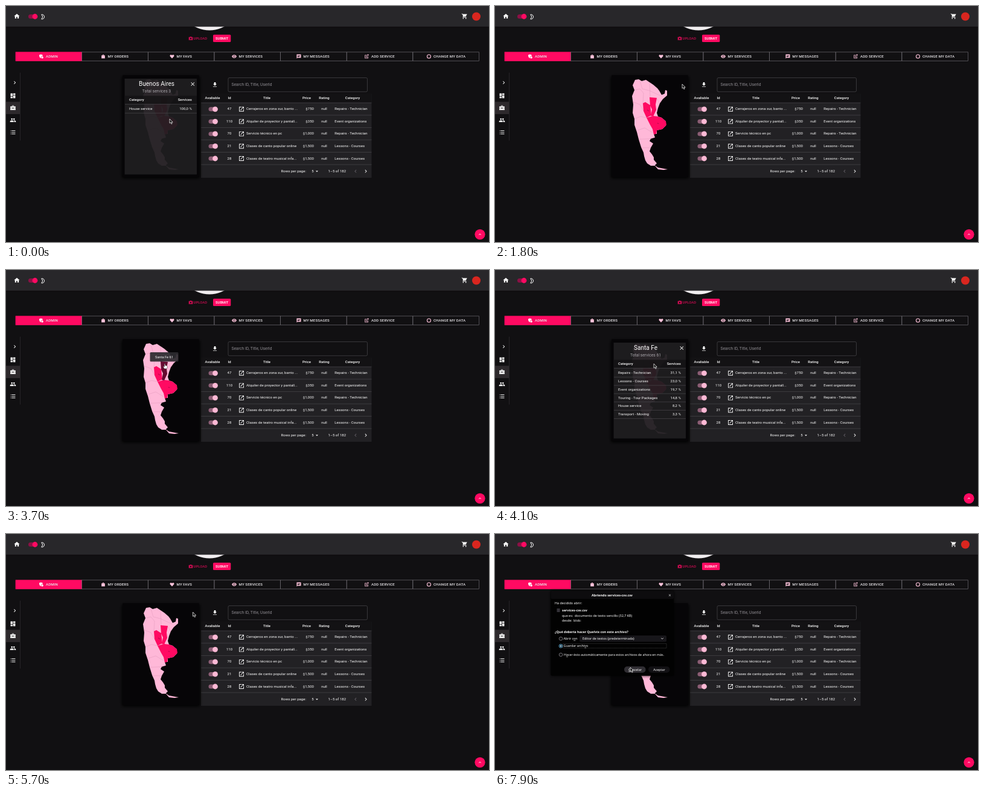
An HTML page that plays this animation: 800 px wide and 393 px high, repeating every 8 s.

```html
<!DOCTYPE html>
<html lang="en">
<head>
<meta charset="utf-8">
<title>Admin services</title>
<style>
  html, body { margin: 0; width: 100%; height: 100%; overflow: hidden; background: #111012; }
  svg { display: block; width: 100%; height: 100%; font: 6px Roboto, sans-serif; fill: #fff; letter-spacing: .04px; }
  path { fill-rule: evenodd; }
  .dialog { font-family: "Noto Sans", sans-serif; font-size: 5.4px; letter-spacing: 0; }
  .key { text-decoration: underline; }
</style>
</head>
<body>
<svg id="stage" viewBox="0 0 800 393"></svg>
<script>
const PINK = '#ff0a62', PALE = '#ffb8d8';

const ICONS = {
  home: 'M10 20v-6h4v6h5v-8h3L12 3 2 12h3v8z',
  cart: 'M7 18a2 2 0 100 4 2 2 0 000-4zM1 2v2h2l3.6 7.6-1.4 2.4C4.5 15.4 5.5 17 7 17h12v-2H7l1.1-2h7.5c.7 0 1.4-.4 1.7-1L21.7 4H5.2l-.9-2zM17 18a2 2 0 100 4 2 2 0 000-4z',
  camera: 'M9 3 7 5H2v15h20V5h-5l-2-2zM12 16a3.5 3.5 0 110-7 3.5 3.5 0 010 7z',
  shield: 'M10 2l8 3v6a6 6 0 00-7 9C5 20 2 14 2 5zM16.5 12a5 5 0 100 10 5 5 0 000-10z',
  bag: 'M4 7h16v14H4zM8 7a4 4 0 018 0h-2a2 2 0 00-4 0z',
  heart: 'M12 21L4 13C-1 8 5 1 12 6c7-5 13 2 8 7z',
  eye: 'M12 4.5C7 4.5 2.7 7.6 1 12c1.7 4.4 6 7.5 11 7.5s9.3-3.1 11-7.5c-1.7-4.4-6-7.5-11-7.5zM12 17a5 5 0 110-10 5 5 0 010 10zm0-8a3 3 0 100 6 3 3 0 000-6z',
  chat: 'M2 2h20v16H6l-4 4zM6 6v2h12V6zM6 9v2h12V9zM6 12v2h8v-2z',
  add: 'M3 5h10v2H5v12h12v-8h2v10H3zM17 1h2v3h3v2h-3v3h-2V6h-3V4h3zM7 10h8v2H7zM7 14h8v2H7z',
  ring: 'M12 2a10 10 0 100 20 10 10 0 000-20zm0 3a7 7 0 110 14 7 7 0 010-14z',
  right: 'M10 6L8.6 7.4 13.2 12l-4.6 4.6L10 18l6-6z',
  left: 'M14 6l1.4 1.4L10.8 12l4.6 4.6L14 18l-6-6z',
  up: 'M6 14l1.4 1.4L12 10.8l4.6 4.6L18 14l-6-6z',
  down: 'M7 10l5 5 5-5z',
  board: 'M3 3h8v10H3zM3 15h8v6H3zM13 11h8v10h-8zM13 3h8v6h-8z',
  work: 'M20 6h-4V4l-2-2h-4L8 4v2H2v6h8v-1h4v1h8V6zm-6 0h-4V4h4zM2 13h8v2h4v-2h8v7H2z',
  people: 'M16 11a3 3 0 100-6 3 3 0 000 6zM8 11a3 3 0 100-6 3 3 0 000 6zM8 13c-2.3 0-7 1.2-7 3.5V19h14v-2.5c0-2.3-4.7-3.5-7-3.5zM16 13c3 0 7 1.2 7 3.5V19h-6v-2.5c0-1.5-1-2.6-2-3.4z',
  list: 'M3 5h2v2H3zM3 11h2v2H3zM3 17h2v2H3zM7 5h14v2H7zM7 11h14v2H7zM7 17h14v2H7z',
  save: 'M19 9h-4V3H9v6H5l7 7 7-7zM5 18v2h14v-2z',
  open: 'M19 19H5V5h7V3H3v18h18v-9h-2zM14 3v2h3.6l-9.8 9.8 1.4 1.4L19 6.4V10h2V3z',
  close: 'M19 6.4L17.6 5 12 10.6 6.4 5 5 6.4 10.6 12 5 17.6 6.4 19 12 13.4 17.6 19 19 17.6 13.4 12z'
};

const icon = (name, x, y, size, fill = '#fff') =>
  `<path d="${ICONS[name]}" fill="${fill}" transform="translate(${x - size / 2} ${y - size / 2}) scale(${size / 24})"/>`;
const rect = (x, y, w, h, fill, extra = '') =>
  `<rect x="${x}" y="${y}" width="${w}" height="${h}" fill="${fill}" ${extra}/>`;
const disc = (x, y, r, fill, extra = '') => `<circle cx="${x}" cy="${y}" r="${r}" fill="${fill}" ${extra}/>`;
const text = (s, x, y, extra = '') => `<text x="${x}" y="${y}" ${extra}>${s}</text>`;
const rule = (x, y, w) => rect(x, y, w, .7, '#48464a');
const toggle = (x, y, track, thumb) =>
  rect(x - 11, y - 3.5, 14, 7, track, 'rx="3.5"') + disc(x, y, 4.4, thumb);
const MID = 'text-anchor="middle"', END = 'text-anchor="end"', BOLD = 'font-weight="500"';

function header() {
  return rect(0, 34, 800, 2, '#000', 'opacity=".3"') + disc(337, -11, 51.5, '#f1eef0') +
    rect(0, 0, 800, 34.5, '#28272a') +
    icon('home', 18, 17, 11) + toggle(48, 17.5, '#8c1045', PINK) +
    '<path d="M58.7 14.2a3.9 3.9 0 110 7.6q3.6-3.8 0-7.6z" fill="none" stroke="#fff"/>' +
    icon('cart', 759.5, 17, 10.5) + disc(779, 17.5, 7, '#d9261f') +
    icon('camera', 306, 54, 8, '#c90c50') +
    text('UPLOAD', 310.5, 56.2, `fill="#c90c50" ${BOLD} font-size="5.9"`) +
    rect(343, 47.7, 29.3, 12.3, PINK, 'rx="1.5"') +
    text('SUBMIT', 357.7, 56, `${MID} ${BOLD} font-size="5.8"`);
}

function tabs() {
  const items = [
    ['ADMIN', 'shield', 66], ['MY ORDERS', 'bag', 168.5], ['MY FAVS', 'heart', 282.5],
    ['MY SERVICES', 'eye', 385.5], ['MY MESSAGES', 'chat', 492.5],
    ['ADD SERVICE', 'add', 605], ['CHANGE MY DATA', 'ring', 708]
  ];
  const w = 767.5 / 7;
  return items.map(([label, name, x], i) =>
    rect(16 + i * w, 76.8, w, 14.8, i ? 'none' : PINK, `stroke="${i ? '#6c696f' : PINK}" stroke-width=".7"`) +
    icon(name, x - 7.5, 84, 8.5, i ? '#ffc4dc' : '#fff') +
    text(label, x, 86.3, `${BOLD} font-size="6.1" letter-spacing=".13" fill="#e9e6ea"`)).join('');
}

function sidebar() {
  return rect(23, 111, .8, 113, '#2c2a2e') + rect(0, 159.5, 23, 20.5, '#2d292c') +
    icon('right', 14.5, 127.5, 10.5) +
    ['board', 'work', 'people', 'list'].map((n, i) => icon(n, 11.5, 149.5 + i * 20.3, 10.5)).join('');
}

function services() {
  const rows = [
    [47, 'Cerrajeros en zona sur, barrio ...', '$750', 'Repairs - Technician'],
    [110, 'Alquiler de proyector y pantall...', '$350', 'Event organizations'],
    [70, 'Servicio técnico en pc', '$1,000', 'Repairs - Technician'],
    [21, 'Clases de canto popular online', '$1,500', 'Lessons - Courses'],
    [28, 'Clases de teatro musical infa...', '$1,500', 'Lessons - Courses']
  ];
  const heads = [['Avaliable', 342], ['Id', 370], ['Title', 432], ['Price', 498], ['Rating', 527], ['Category', 574]];
  return rect(323, 146, 282.5, 140, '#222124') + rect(323, 146, 282.5, 15, '#131214') +
    icon('save', 346, 131, 10.5) +
    rect(368, 119.5, 230.5, 23.3, 'none', 'rx="2" stroke="#454347" stroke-width=".8"') +
    text('Search ID, Title, UserId', 373.5, 133.2, 'font-size="6.7" fill="#918e94"') +
    heads.map(([s, x]) => text(s, x, 155.2, `${MID} ${BOLD}`)).join('') + rule(323, 160.8, 282.5) +
    rows.map(([id, title, price, kind], i) => {
      const y = 171.5 + i * 20.55, base = y + 1.8;
      return toggle(346.5, y + .3, '#8b5d74', '#ffb9d5') + text(id, 370, base, MID) +
        icon('open', 390, y + .3, 10.5) + text(title, 398, base) + text(price, 510, base, END) +
        text('null', 527, base, MID) + text(kind, 544.3, base) + rule(323, y + 10, 282.5);
    }).join('') +
    text('Rows per page:', 455.5, 277.2) + text('5', 508, 277.2, MID) + icon('down', 515, 275.3, 10) +
    text('1–5 of 182', 533.5, 277.2) + icon('left', 579, 275.2, 10.5, '#656268') + icon('right', 596, 275.2, 10.5) +
    disc(785, 380.3, 8.6, PINK) + icon('up', 785, 380.3, 8);
}

function map() {
  const land = 'M232 123L238 122 243 125 250 123 256 127 262 131 269 137 272 141 276 148 281 146 282 140 285 141 285 149 278 155 273 162 270 170 268 178 270 184 276 186 283 192 283 199 277 205 268 207 268 213 263 213 265 219 258 221 256 225 262 229 258 236 256 242 260 247 263 252 263 256 268 262 264 266 258 266 252 262 249 257 247 250 246 244 242 235 238 222 235 210 231 198 231 188 228 178 229 164 227 150 231 140 228 132ZM264 265L270 269 286 272 279 273 270 272Z';
  const borders = 'M231 140L240 138 246 145 245 163M240 125L244 138 256 141 275 150M229 160L240 164 246 175M231 188L241 184 251 186M236 207L248 203 261 211M238 222L258 221M242 236L257 236M256 127L257 152M267 153L273 162';
  return rect(192, 117, 129, 170, '#000', 'rx="3" filter="url(#blur)"') +
    rect(193, 115, 127, 170, '#060507', 'rx="2"') +
    `<path d="${land}" fill="${PALE}"/><path d="${borders}" fill="none" stroke="#d990b3" stroke-width=".4"/>
     <path d="M245 162L249 160 257 165 259 182 251 186 246 175ZM251 186L262 183 270 184 276 186 283 192 284 198 277 205 268 207 267 213 263 214 261 205 257 198Z" fill="${PINK}"/>
     <path id="santaFe" d="M256 152L268 153 266 164 267 173 262 184 258 183 260 172 257 166Z"/>
     <path d="M252 173l3 2M269 195l2 1" stroke="#900a40" stroke-width=".8"/>`;
}

function card(id, title, total, rows) {
  const row = ([name, share], i) => {
    const y = 173 + i * 13.85;
    return text(name, 204, y) + text(share + ' %', 308, y, END) + rule(197, y + 4.9, 119);
  };
  return `<g id="${id}">` + rect(196.5, 121, 119.5, 159.5, '#1f1e20', 'opacity=".945"') +
    rect(197, 149.5, 119, 14, '#111012', 'opacity=".7"') +
    disc(309, 130, 8, '#414044', 'class="halo"') + icon('close', 309.3, 130, 10) +
    text(title, 249.5, 133.2, `${MID} font-size="10"`) +
    text('Total services ' + total, 249.5, 143.5, `${MID} font-size="6.7" fill="#aaa7ac"`) +
    text('Category', 204, 158.2, BOLD) + text('Services', 308, 158.2, `${END} ${BOLD}`) +
    rule(197, 163.2, 119) + rows.map(row).join('') + '</g>';
}

function dialog() {
  const strong = 'font-weight="600"', key = c => `<tspan class="key">${c}</tspan>`;
  const radio = y => disc(109, y, 2.8, 'none', 'stroke="#a3a0a6" stroke-width=".7"');
  return '<g id="dialog" class="dialog">' +
    rect(92.5, 95, 203.5, 141, '#000', 'rx="2" filter="url(#blur)"') +
    rect(92.5, 95, 203.5, 141, '#020202', 'rx="2"') + rect(92.5, 95, 203.5, 13, '#0d0c0e', 'rx="2"') +
    text('Abriendo services-csv.csv', 194, 104, `${MID} ${strong}`) + icon('close', 289.5, 102, 6) +
    text('Ha decidido abrir:', 99, 117) + rect(102.5, 124, 5, 6, '#343238') +
    text('services-csv.csv', 111, 128.8, strong) + text('que es:', 111, 138) +
    text('documento de texto sencillo (32,7 KB)', 132, 138) +
    text('desde:', 111, 146.3) + text('blob:', 130, 146.3) +
    text('¿Qué debería hacer Quelvix con este archivo?', 99, 165, strong) +
    radio(174.3) + text(`Abrir c${key('o')}n`, 113.5, 176.2) +
    rect(140, 169, 144, 10.5, '#17161a', 'rx="2"') + text('Editor de textos (predeterminada)', 145, 176.2) +
    '<path d="M275 173l2 2 2-2" fill="none" stroke="#ddd" stroke-width=".8"/>' +
    disc(109, 186.5, 2.9, '#061c28', 'stroke="#6fb9df" stroke-width=".9"') + disc(109, 186.5, 1.2, '#d7f0ff') +
    rect(112.5, 182.5, 171.5, 7.5, 'none', 'stroke="#777" stroke-width=".5" stroke-dasharray="1"') +
    text(`Guardar archi${key('v')}o`, 113.5, 188.3) +
    radio(201) + text(`H${key('a')}cer ésto automáticamente para estos archivos de ahora en más.`, 114, 203, 'font-size="5.3"') +
    rect(214, 220.5, 35.5, 10.5, '#151417', 'id="cancel" rx="5"') + rect(254, 220.5, 35.5, 10.5, '#121114', 'rx="5"') +
    text(`${key('C')}ancelar`, 232, 227.8, MID) + text('Aceptar', 272, 227.8, MID) + '</g>';
}

const tip = `<g id="tip">${rect(238.5, 137, 47, 15.5, '#2d2c30', 'rx="1.5" opacity=".93"')}${text('Santa Fe 61', 262, 146.5, `${MID} font-size="5.6"`)}</g>`;

const cursor = `<g id="cursor">
  <path id="arrow" d="M0 0V7.2L1.7 5.8 2.9 8.5 4.2 7.9 3 5.4H5.2Z" fill="#111" stroke="#fff" stroke-width=".7"/>
  <path id="hand" d="M-.7 .5Q0-.6.7.5V3Q3.800 2.800 4.200 4.300V6L3.400 8.500H-.6L-2.800 5Q-2.500 4-.7 5.300Z" fill="#fff" stroke="#222" stroke-width=".5"/>
  <path id="beam" d="M-1.5 0Q0 0 0 .8 0 0 1.5 0M0 .8V5.8M-1.5 6.6Q0 6.6 0 5.8 0 6.6 1.5 6.6" fill="none" stroke="#fff" stroke-width=".7"/></g>`;

const stage = document.getElementById('stage');
stage.innerHTML = '<defs><filter id="blur" x="-10%" y="-10%" width="120%" height="120%"><feGaussianBlur stdDeviation="2.5"/></filter></defs>' +
  header() + tabs() + sidebar() + services() + map() +
  card('buenosAires', 'Buenos Aires', 3, [['House service', '100,0']]) +
  card('santaFeCard', 'Santa Fe', 61, [
    ['Repairs - Technician', '31,1'], ['Lessons - Courses', '23,0'], ['Event organizations', '19,7'],
    ['Touring - Tour Packages', '14,8'], ['House service', '8,2'], ['Transport - Moving', '3,3']
  ]) + tip + dialog() + cursor;

const $ = id => document.getElementById(id);
const halos = stage.querySelectorAll('.halo');
const clamp = v => Math.max(0, Math.min(1, v));
const within = (t, a, b) => t >= a && t < b;
const show = (el, v) => el.setAttribute('opacity', +v);

// time, x, y of the pointer's hot spot
const track = [
  [0, 271, 188], [1000, 271, 188], [1350, 310, 130], [1800, 310, 130], [2300, 259, 162.5],
  [3000, 259, 162.5], [3300, 263, 156], [4300, 263, 156], [4900, 302, 151], [5100, 309.5, 130],
  [5800, 309.5, 130], [6250, 346, 130], [6800, 346, 130], [7700, 224, 222], [8000, 224, 222]
];

function pointer(t) {
  const i = track.findIndex(k => k[0] > t);
  const [t0, x0, y0] = track[i - 1], [t1, x1, y1] = track[i];
  const p = (t - t0) / (t1 - t0), e = p * p * (3 - 2 * p);
  return [x0 + (x1 - x0) * e, y0 + (y1 - y0) * e];
}

function draw(now) {
  const t = Math.floor(now % 8000 / 100) * 100;
  show($('buenosAires'), clamp((1800 - t) / 200));
  show($('santaFeCard'), clamp((t - 3800) / 200) * clamp((5500 - t) / 200));
  const closing = within(t, 1300, 1800) || within(t, 5000, 5500);
  halos.forEach(h => show(h, closing));
  const hover = within(t, 3200, 4000);
  $('santaFe').setAttribute('fill', hover ? '#650a30' : PINK);
  show($('tip'), clamp((t - 3100) / 200) * clamp((4000 - t) / 200));
  show($('dialog'), t >= 6500);
  $('cancel').setAttribute('fill', t >= 7600 ? '#302e33' : '#151417');

  const beam = within(t, 2300, 3200);
  const hand = closing || hover || within(t, 6200, 6500);
  show($('beam'), beam);
  show($('hand'), hand);
  show($('arrow'), !beam && !hand);
  $('cursor').setAttribute('transform', `translate(${pointer(t)})`);
  requestAnimationFrame(draw);
}
requestAnimationFrame(draw);
</script>
</body>
</html>
```
